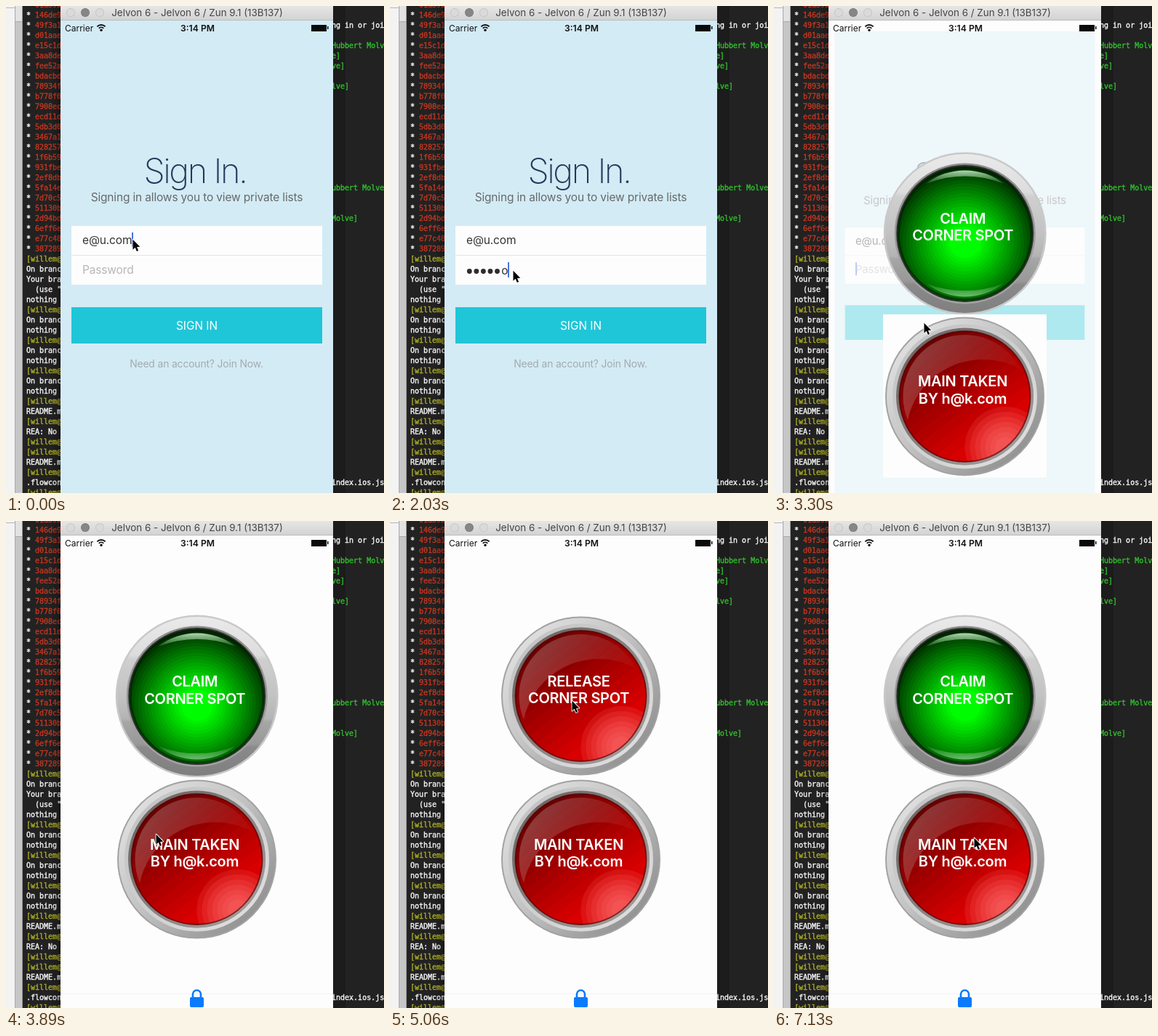
These frames come from a looping animation (520x671 px, 8 s). An HTML page with a canvas:

```html
<!DOCTYPE html>
<html lang="en">
<head>
<meta charset="utf-8">
<title>Sign in and claim a spot</title>
<style>
  html, body { margin: 0; width: 100%; height: 100%; overflow: hidden; background: #222222; }
  canvas { display: block; }
</style>
</head>
<body>
<canvas id="stage" width="520" height="671"></canvas>
<script>
const ctx = document.getElementById('stage').getContext('2d');
const LOOP = 8000, TAU = Math.PI * 2;
const WHITE = '#fdfdfd', CARET = '#4a72e8';
const ANSI = { white: '#f4f4f4', red: '#c23621', green: '#2fbc2c', yellow: '#adad27' };
const EMAIL = 'e@u.com', SECRET = 'password';
const AUTHOR = 'Hubbert Molve]', PROMPT = '[willem@';
const KEYS = [1450, 1540, 1630, 1800, 1980, 2030, 2150, 2200];

// The screen refreshes only at these moments: start, end, number of steps.
const REFRESH = [
  [450, 800, 6], [980, 980, 1], [1450, 1630, 3], [1800, 1800, 1],
  [1980, 2030, 2], [2150, 2200, 2], [2440, 2950, 9], [3070, 3220, 4],
  [3300, 3570, 4], [3720, 3890, 3], [4030, 4490, 8], [4730, 5060, 5],
  [5920, 6010, 2], [6160, 6250, 2], [6750, 7130, 7]
];

// time, x, y
const POINTER = [
  [400, 174, 321], [800, 169, 364], [2380, 169, 364], [2860, 206, 436],
  [3640, 206, 436], [3890, 206, 431], [3970, 206, 431], [4490, 250, 247],
  [6690, 250, 247], [7130, 275, 436]
];

// time, opacity of the upper button
const PRESS = [
  [4700, 1], [4730, .6], [4815, .25], [4895, .4], [4978, .8], [5060, 1],
  [5900, 1], [5920, .4], [6010, .7], [6160, .9], [6250, 1]
];

const HASHES = ('01a39b 146de9 49f3a1 d01aae e15c1d 3aa8de fee52a bdacbd 78934f b778f0 7908ec ' +
  'ecd11d 5db3d0 3467a1 828257 1f6b59 931fbe 2ef8db 5fa14e 7d70c5 51130b 2d94bd 6eff6e ' +
  'e77c48 387289').split(' ');
const SHELL = [
  PROMPT, 'On branch', 'Your bran', '  (use "g', 'nothing',
  PROMPT, 'On branch', 'nothing', PROMPT, 'On branch', 'nothing',
  PROMPT, 'On branch', 'nothing', PROMPT, 'README.md', PROMPT, 'REA: No',
  PROMPT, PROMPT, 'README.md', PROMPT, '.flowconf', PROMPT
];
// row, number of trailing characters of the author that stick out
const AUTHORS = [[4, 14], [5, 2], [6, 3], [8, 4], [18, 13], [21, 6]];

function heldTime(t) {
  let held = 0;
  for (const [a, b, n] of REFRESH) {
    if (t < a) break;
    const step = (b - a) / (n - 1);
    held = t >= b ? b : a + Math.floor((t - a) / step) * step;
  }
  return held;
}

function track(keys, t, ease = u => u) {
  if (t <= keys[0][0]) return keys[0].slice(1);
  for (let i = 1; i < keys.length; i++) {
    const [t0, ...from] = keys[i - 1], [t1, ...to] = keys[i];
    if (t < t1) {
      const u = ease((t - t0) / (t1 - t0));
      return from.map((v, k) => v + (to[k] - v) * u);
    }
  }
  return keys[keys.length - 1].slice(1);
}
const smooth = u => u * u * (3 - 2 * u);

function rect(x, y, w, h, fill) {
  ctx.fillStyle = fill;
  ctx.fillRect(x, y, w, h);
}

function disc(x, y, r, fill) {
  ctx.fillStyle = fill;
  ctx.beginPath();
  ctx.arc(x, y, r, 0, TAU);
  ctx.fill();
}

function ring(r, width, stroke) {
  ctx.strokeStyle = stroke;
  ctx.lineWidth = width;
  ctx.beginPath();
  ctx.arc(0, 0, r, 0, TAU);
  ctx.stroke();
}

function clipDisc(r) {
  ctx.beginPath();
  ctx.arc(0, 0, r, 0, TAU);
  ctx.clip();
}

function linear(x0, y0, x1, y1, ...stops) {
  const g = ctx.createLinearGradient(x0, y0, x1, y1);
  stops.forEach(([at, color]) => g.addColorStop(at, color));
  return g;
}

function text(s, x, y, size, color, { weight = 400, align = 'left', gap = 0 } = {}) {
  ctx.font = `${weight} ${size}px Inter, Roboto, sans-serif`;
  ctx.letterSpacing = gap + 'px';
  ctx.textAlign = align;
  ctx.fillStyle = color;
  ctx.fillText(s, x, y);
  const width = ctx.measureText(s).width;
  ctx.letterSpacing = '0px';
  return width;
}

// A hairline outline gives the slightly heavy look of terminal type.
function mono(s, x, row, color) {
  ctx.font = '10px "DejaVu Sans Mono", monospace';
  ctx.textAlign = 'left';
  ctx.fillStyle = ctx.strokeStyle = color;
  ctx.lineWidth = .4;
  ctx.fillText(s, x, row * 14 + 2);
  ctx.strokeText(s, x, row * 14 + 2);
}

function drawTerminal() {
  rect(0, 0, 520, 671, '#222222');
  rect(0, 0, 13, 671, '#f3f3f3');
  rect(0, 2, 13, 1, '#b4b4b4');
  rect(12, 0, 1, 671, '#a9a9a9');
  rect(13, 0, 10, 671, '#c6c6c6');
  rect(13, 0, 10, 21, '#e2e2e2');
  rect(13, 21, 10, 1, '#a8a8a8');
  rect(22, 0, 1, 671, '#8b8b8b');
  rect(450, 0, 17, 671, 'rgba(0,0,0,.18)');

  HASHES.forEach((hash, i) => {
    mono('*', 28, i, ANSI.white);
    mono(hash, 40, i, ANSI.red);
  });
  SHELL.forEach((line, i) =>
    mono(line, 28, HASHES.length + i, line === PROMPT ? ANSI.yellow : ANSI.white));
  AUTHORS.forEach(([row, n]) => mono(AUTHOR.slice(-n), 448, row, ANSI.green));
  mono('ng in or join', 448, 2, ANSI.white);
  mono('index.ios.js', 448, 47, ANSI.white);

  rect(60, 0, 15, 671, linear(60, 0, 75, 0, [0, 'rgba(0,0,0,0)'], [1, 'rgba(0,0,0,.25)']));
}

function drawTitleBar() {
  rect(75, 0, 375, 20, linear(0, 0, 0, 20, [0, '#e6e6e6'], [1, '#d2d2d2']));
  rect(75, 19, 375, 1, '#bcbcbc');
  [[89, '#dadada', '#c2c2c2'], [109, '#868686', '#777777'], [129, '#dadada', '#c2c2c2']]
    .forEach(([x, fill, edge]) => {
      disc(x, 9, 6, edge);
      disc(x, 9, 5.2, fill);
    });
  text('Jelvon 6 - Jelvon 6 / Zun 9.1 (13B137)', 263, 14, 13.4, '#444444', { align: 'center' });
}

function drawStatus() {
  text('Carrier', 81, 35, 12, '#111111');
  text('3:14 PM', 263.5, 35, 12.2, '#111111', { weight: 600, align: 'center' });
  ctx.strokeStyle = '#111111';
  ctx.lineWidth = 1.8;
  for (const r of [4.6, 8]) {
    ctx.beginPath();
    ctx.arc(131, 34, r, -Math.PI * .75, -Math.PI * .25);
    ctx.stroke();
  }
  disc(131, 33.2, 1.7, '#111111');
  rect(420, 26, 21, 9, '#0a0a0a');
  rect(442, 28, 1.5, 4, '#0a0a0a');
}

function drawPassword(t) {
  const count = t >= 3070 ? 0 : KEYS.filter(k => t >= k).length;
  let x = 105;
  if (count) {
    for (let i = 0; i < count - 1; i++) disc(109.3 + i * 9.55, 365.5, 3.4, '#2d2d2d');
    x += (count - 1) * 9.55 + .6;
    x += text(SECRET[count - 1], x, 370, 15.5, '#2d2d2d');
  } else {
    text('Password', 105, 369, 15.5, '#b4b6b9', { gap: -.15 });
  }
  if ((t >= 980 && t < 2500) || t >= 3070) rect(Math.floor(x), 353, 2, count ? 21 : 19, CARET);
}

function drawSignIn(t) {
  rect(75, 20, 375, 667, '#d3ebf5');
  text('Sign In.', 260, 243.5, 47, '#233a5c', { weight: 200, align: 'center', gap: -2.5 });
  text('Signing in allows you to view private lists', 262.5, 269, 15.5, '#66696c',
    { align: 'center', gap: -.16 });

  rect(90, 303, 345, 81, WHITE);
  rect(90, 343, 345, 1, '#e0e5e8');
  text(EMAIL, 105, 328, 15.5, '#333333', { gap: -.15 });
  if (t < 450) rect(173, 312, 2, 20, CARET);
  drawPassword(t);

  const pressed = t >= 2880 && t < 3070;
  rect(90, 415, 345, 50, pressed ? '#1bafbe' : '#1fc6d7');
  text('SIGN IN', 262.5, 445.5, 15.4, pressed ? '#dff3f5' : '#ffffff', { align: 'center' });
  text('Need an account? Join Now.', 262, 498, 13.9, '#a3abaf', { align: 'center', gap: -.15 });
}

function label(lines) {
  lines.forEach((line, i) =>
    text(line, -3, -13.5 + i * 23.5, 20, '#ffffff', { weight: 600, align: 'center', gap: -.3 }));
}

function crescent(side, alpha) {
  const a = Math.PI * .29;
  ctx.fillStyle = linear(0, side * 87, 0, side * 70,
    [0, `rgba(225,255,225,${alpha})`], [1, `rgba(160,230,160,${alpha * .3})`]);
  ctx.beginPath();
  ctx.arc(0, 0, 87, side * a, side * (Math.PI - a), side < 0);
  ctx.quadraticCurveTo(0, side * 89, 87 * Math.cos(a), side * 87 * Math.sin(a));
  ctx.fill();
}

function drawGreen(y, lines) {
  ctx.save();
  ctx.translate(262.7, y);
  disc(0, 0, 112, '#c9c9c9');
  disc(0, 0, 109.5, linear(0, -110, 0, 110,
    [0, '#eaeaea'], [.24, '#dddddd'], [.27, '#cfcfcf'], [.5, '#c2c2c2'], [.64, '#b4b4b4'],
    [.66, '#a6a6a6'], [.8, '#989898'], [.82, '#8a8a8a'], [1, '#7f7f7f']));
  ring(95.5, 3, linear(0, -96, 0, 96, [0, '#8f8f8f'], [1, '#a2a2a2']));
  disc(0, 0, 94.5, '#2b302b');
  ctx.save();
  clipDisc(92.5);
  const steps = 18;
  for (let i = 0; i <= steps; i++) {
    const u = i / steps;
    disc(0, 12, 104 - 82 * u, `rgb(0,${Math.round(38 + 214 * Math.pow(u, .9))},0)`);
  }
  ring(92, 4, 'rgba(0,30,0,.6)');
  ctx.restore();
  crescent(-1, .8);
  crescent(1, .5);
  label(lines);
  ctx.restore();
}

// Light on the face everywhere outside a large offset circle.
function gloss() {
  ctx.save();
  ctx.beginPath();
  ctx.rect(-95, -95, 190, 130);
  ctx.moveTo(131, 55);
  ctx.arc(25, 55, 106, 0, TAU);
  ctx.clip('evenodd');
  clipDisc(85);
  rect(-95, -95, 190, 130, linear(-60, -70, 50, 0,
    [0, 'rgba(190,140,140,.42)'], [1, 'rgba(200,110,110,.06)']));
  ctx.restore();
}

function drawRed(y, lines) {
  ctx.save();
  ctx.translate(262.5, y);
  rect(-112.5, -113, 225, 225, WHITE);
  disc(0, 0, 109.5, '#a2a2a2');
  disc(0, 0, 107.5, linear(-80, -75, 80, 75, [0, '#dedede'], [.45, '#c3c3c3'], [1, '#939393']));
  ring(97, 5, linear(-70, -70, 70, 70, [0, '#c4c4c4'], [.5, '#cfcfcf'], [1, '#dcdcdc']));
  ring(92.5, 4, linear(-70, -70, 70, 70, [0, '#6f6666'], [1, '#a09a9a']));

  ctx.save();
  clipDisc(90.5);
  ctx.save();
  ctx.rotate(Math.PI * .29);
  const bands = 14;
  for (let i = 0; i < bands; i++) {
    const u = i / (bands - 1);
    rect(-92 + i * 13.2, -95, 14, 190, `rgb(${Math.round(108 + 108 * Math.min(1, u * 1.2))},0,0)`);
  }
  ctx.restore();
  for (let i = 0; i < 7; i++) disc(56, 70, 56 - i * 7, 'rgba(255,125,125,.14)');
  ctx.restore();

  gloss();
  ring(90, 2, 'rgba(70,0,0,.6)');
  label(lines);
  ctx.restore();
}

function drawLock() {
  ctx.strokeStyle = ctx.fillStyle = '#0a7aff';
  ctx.lineWidth = 2.6;
  ctx.beginPath();
  ctx.moveTo(257, 657);
  ctx.lineTo(257, 652);
  ctx.arc(262.5, 652, 5.5, Math.PI, 0);
  ctx.lineTo(268, 657);
  ctx.stroke();
  ctx.beginPath();
  ctx.roundRect(253, 656, 19, 14, 2);
  ctx.fill();
}

function drawSpots(t, offset) {
  ctx.save();
  ctx.translate(0, offset);
  rect(75, 651, 375, 1, '#f1f1f1');
  const taken = t >= 4890 && t < 6000;
  if (taken) drawRed(241, ['RELEASE', 'CORNER SPOT']);
  else drawGreen(241.5, ['CLAIM', 'CORNER SPOT']);
  const [opacity] = track(PRESS, t);
  if (opacity < 1) {
    ctx.globalAlpha = 1 - opacity;
    rect(150, 128, 225, 226, WHITE);
    ctx.globalAlpha = 1;
  }
  drawRed(466, ['MAIN TAKEN', 'BY h@k.com']);
  drawLock();
  ctx.restore();
}

function drawPhone(t) {
  ctx.save();
  ctx.beginPath();
  ctx.rect(75, 20, 375, 651);
  ctx.clip();
  rect(75, 20, 375, 651, WHITE);

  // critically damped spring carries the new page up
  const x = Math.max(0, t - 3070) / 1000 * 16.5;
  const p = t >= 3570 ? 1 : 1 - (1 + x) * Math.exp(-x);
  if (p < 1) {
    const scale = 1 - .05 * p;
    ctx.save();
    ctx.translate(262.5, 353.5);
    ctx.scale(scale, scale);
    ctx.translate(-262.5, -353.5);
    drawSignIn(t);
    ctx.globalAlpha = .72 * p;
    rect(74, 19, 377, 669, WHITE);
    ctx.restore();
  }
  if (p > 0) drawSpots(t, 667 * (1 - p));
  drawStatus();
  ctx.restore();
}

function drawPointer(t) {
  const [x, y] = track(POINTER, t, smooth);
  const shape = [[0, 0], [0, 14], [3.1, 11.1], [5.4, 16.2], [7.6, 15.2], [5.5, 10.2], [9.8, 10]];
  ctx.save();
  ctx.translate(x + .5, y + .7);
  ctx.beginPath();
  shape.forEach(([px, py]) => ctx.lineTo(px, py));
  ctx.closePath();
  ctx.lineJoin = 'round';
  ctx.lineWidth = 1.7;
  ctx.strokeStyle = '#ffffff';
  ctx.stroke();
  ctx.fillStyle = '#000000';
  ctx.fill();
  ctx.restore();
}

const start = performance.now();
function frame() {
  const t = heldTime((performance.now() - start) % LOOP);
  drawTerminal();
  drawTitleBar();
  drawPhone(t);
  drawPointer(t);
  requestAnimationFrame(frame);
}
frame();
</script>
</body>
</html>
```
